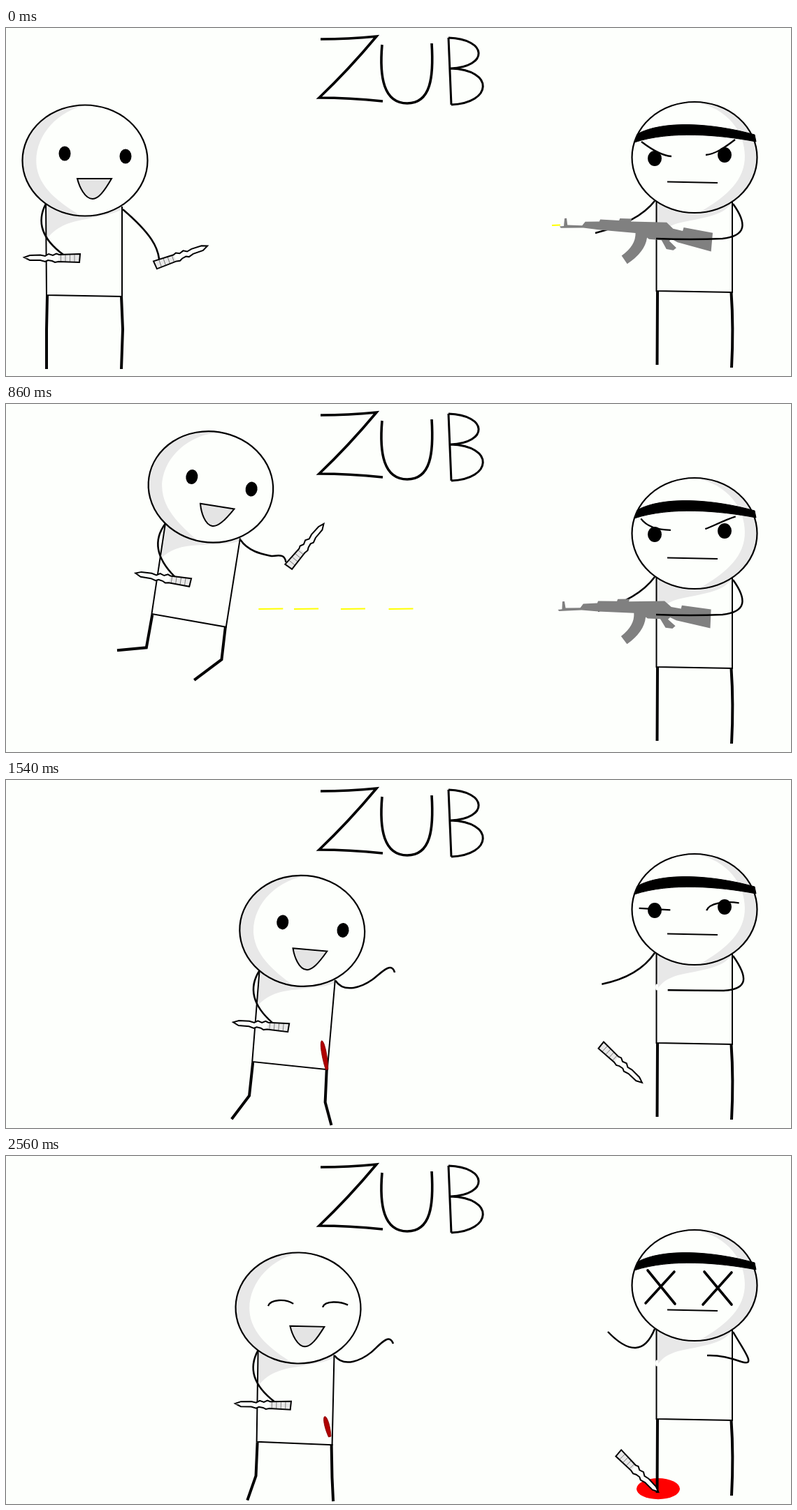
Animation of 1123 by 499 pixels, one loop 2.72 s. Source, as an HTML page with a canvas:

```html
<!DOCTYPE html>
<html>
<head>
<meta charset="utf-8">
<style>
html, body { margin: 0; width: 1123px; height: 499px; overflow: hidden; background: #fdfffc; }
canvas { display: block; }
</style>
</head>
<body>
<canvas id="stage" width="1123" height="499"></canvas>
<script>
const c = document.getElementById('stage').getContext('2d');
const LOOP = 2720, END = 2560;
const BG = '#fdfffc', SHADE = '#e8e8e8', RAD = Math.PI / 180;
const AIM = 5, HIT = 920, THROW = 1070, LAND = 1155, STAB = 1573, LAUGH = 1900, DEAD = 2400;

// Progress of t from a to b, held at 0 and 1 outside.
const ramp = (t, a, b) => Math.max(0, Math.min(1, (t - a) / (b - a)));
const mix = (a, b, p) => a + (b - a) * p;

// Blend two paths that have the same commands.
const NUM = /-?\d+(\.\d+)?/g;
function morph(from, to, p) {
  const n = to.match(NUM);
  let i = 0;
  return from.replace(NUM, v => mix(+v, +n[i++], p).toFixed(2));
}

function draw(d, width, fill, color = '#000') {
  const p = new Path2D(d);
  if (fill) { c.fillStyle = fill; c.fill(p); }
  if (width) { c.lineWidth = width; c.strokeStyle = color; c.stroke(p); }
}

function oval(x, y, rx, ry, fill, width) {
  c.beginPath();
  c.ellipse(x, y, rx, ry, 0, 0, 7);
  if (fill) { c.fillStyle = fill; c.fill(); }
  if (width) { c.lineWidth = width; c.strokeStyle = '#000'; c.stroke(); }
}

function place(x, y, deg, fn, flip = 1) {
  c.save();
  c.translate(x, y);
  c.rotate(deg * RAD);
  c.scale(flip, 1);
  fn();
  c.restore();
}

// Head with a shaded side.
function head(x, y, shade) {
  oval(x, y, 89.5, 79.5, BG);
  c.save();
  c.clip();
  draw(shade, 0, SHADE);
  c.restore();
  oval(x, y, 89.5, 79.5, null, 2.2);
}

// Knife pointing right, handle end at the origin.
function knife() {
  const shape = 'M0 -6L30 -5L34 -6.5L39 -4L45 -6L50 -3L57 -4.5L72 -4L80 -1L72 3L57 3L50 5L46 3L40 4L36 6L31 5L1 6Z';
  draw(shape, 0, BG);
  draw('M0 -6L30 -5L31 5L1 6Z', 0, SHADE);
  for (let x = 8; x < 30; x += 6.5) draw(`M${x} -5V5`, 0.7, null, '#555');
  draw(shape, 2);
}

function title() {
  draw('M450 16Q490 16 530 12Q490 60 448 100Q490 100 539 105', 3.6);
  draw('M538 24C534 70 540 108 574 108C608 108 612 70 609 22', 3.6);
  draw('M633 14L637 110M633 14C690 16 690 56 636 58C700 60 695 108 637 110', 3);
}

// Head centre and lean of the jumping man: shuffle, leap, fall, step back.
function body(t) {
  const back = ramp(t, 1380, 1600);
  const rise = (1 - ramp(t, 600, 970)) ** 2, fall = ramp(t, 970, LAND) ** 2;
  return {
    x: 113 + 26 * ramp(t, 0, 560) + 300 * ramp(t, 600, LAND) ** 0.88 - 21 * back,
    y: 112 + 78 * rise + 100 * fall + 6 * back,
    rot: 14.7 * ramp(t, 640, 1000) - 13.4 * back
  };
}

function leg(hip, knee, deg, len) {
  const a = deg * RAD;
  draw(`M${hip} 194L${knee} 242L${knee + len * Math.cos(a)} ${242 + len * Math.sin(a)}`, 4);
}

function jumper(t, b) {
  place(b.x, b.y, b.rot, () => {
    const bend = ramp(t, 0, 560), lift = ramp(t, 600, 1060);
    const land = ramp(t, 1060, LAND), rest = ramp(t, 1820, 2220);
    leg(-54, -55, 90 + 82 * bend - 11 * lift - 39 * land - 14 * rest, 57 - 15 * bend - 5 * rest);
    leg(52, 54, 92 + 50 * bend - 14 * lift - 58 * land + 16 * rest, 57 - 14 * lift - 9 * land);

    draw('M-56 62L-55 193L53 195L53 66Z', 0, BG);
    draw('M-56 55V115C-43 95 -23 88 2 84C27 78 38 78 53 70V50Z', 0, SHADE);
    draw('M-56 62L-55 193L53 195L53 66', 2);

    if (t >= HIT) place(41.5, 154.5, -14.7, () => {
      const h = 12 + 30 * ramp(t, HIT, 1180) - 12 * ramp(t, 2240, END);
      draw(`M0 0C4 1 4.5 ${h * 0.6} 2 ${h}H-1.5C-4 ${h * 0.6} -4 1 0 0Z`, 0.8, '#b00000', '#800000');
    });

    const swing = ramp(t, 640, 1040);
    draw(morph('M54 70C68 82 85 98 95 113C101 122 105 133 106 141',
      'M53.6 67C68 85 93 72 106 61C118 50 131 32 137 48', swing), 2.5);
    draw('M-56 62C-68 85 -65 110 -31 135', 2.5);
    place(-7, 140, 0, knife, -1);
    if (t <= THROW) place(100 + 50 * swing, 150 - 98 * swing, -19.4 - 72 * swing, knife);

    head(0, 0, 'M5 -80C-43 -72 -75 -30 -69 10C-63 45 -28 65 -5 80H-100V-80Z');
    if (t < LAUGH) {
      oval(-29, -10, 8.5, 10.5, '#000');
      oval(58, -6, 8.5, 10.5, '#000');
    } else {
      draw('M-43 -2C-40 -12 -18 -13 -7 -6M35 -2C38 -12 60 -11 71 -6', 2.3);
    }
    draw('M-11 26L38 26C27 45 19 55 11 55C0 55 -8 38 -11 26Z', 2, '#e4e4e4');
  });
}

function gun(t) {
  const lower = ramp(t, 600, 1020);
  const kick = t < 600 ? Math.sin(t * Math.PI / 60) * 0.6 : 0;
  const tilt = (AIM + 1.5 * ramp(t, 0, 600)) * (1 - lower) + kick;
  const fall = 0.00253 * Math.max(0, t - 1080) ** 2;
  place(1003 - 3 * lower, 305 + 3 * ramp(t, 0, 600) * (1 - lower) + fall, tilt, () => {
    c.translate(-1000, -305);
    draw('M788 303L794 302V291L797 290.5L799 300L820 299L824 293L844 291L845 288L872 287L873 284L890 283L889 287L940 284L950 292L964 294L965 289L1007 293V320L958 311L949 307L946 310L957 319L953 323L943 322L935 310L917 310L914 308Q913 329 889 348L880 337Q899 321 897 303L846 303L822 302L790 305Z', 0, '#808080');
  });
}

// Eyebrows sink from angry through calm to sad.
function brows(t) {
  const calm = 'M907 167C904 177 918 176 949 175M1045 164C1020 161 1003 166 999 174';
  const d = t < 1340
    ? morph('M909 163C922 173 937 183 952 184M1043 160C1030 170 1015 181 1001 182', calm, ramp(t, 600, 1340))
    : morph(calm, 'M904 204C908 192 935 196 952 200M1053 191C1035 188 1010 190 1006 203', ramp(t, 1340, 1780));
  draw(d, 2.3);
}

function gunner(t) {
  const pool = 31 * ramp(t, 1620, 2220);
  if (pool) oval(933, 484 - pool * 0.22, pool, 3 + pool * 0.39, '#f00');
  draw('M932 378L931.5 483M1037.5 379Q1041 430 1038 487', 4);
  draw('M930.5 248V377L1039 379V248Z', 0, BG);
  draw('M930 240V303C940 285 955 280 985 275C1010 270 1030 265 1038 250Z', 0, SHADE);
  draw('M930.5 248V377L1039 379V248', 2);
  if (t > 1100) oval(931, 297, 2, 4.5, BG);

  const flinch = ramp(t, 1400, 1820), clutch = ramp(t, 1820, 2220);
  const hang = morph('M928 248Q905 278 843 294', 'M928 248Q905 282 854 302', ramp(t, 600, 1340));
  draw(morph(morph(hang, 'M928 248Q905 282 849 274', flinch), 'M928 248Q907 300 861 252', clutch), 2.5);
  gun(t);
  const bent = morph('M1040 252C1060 280 1060 298 1025 302Q980 304 930 302',
    'M1040 252C1066 290 1066 304 1030 302Q1000 298 980 300', flinch);
  draw(morph(bent, 'M1040 252C1056 280 1074 302 1052 295Q1025 285 1003 286', clutch), 2.5);

  head(985, 185.5, 'M985 106C1040 116 1062 160 1056 195C1050 230 1015 250 990 266H1080V106Z');
  draw('M903 152C940 132 1010 136 1071 153L1073 163C1020 153 950 147 899 164Z', 1, '#000');
  draw('M946 220.5L1018 222', 2.2);
  if (t < DEAD) {
    oval(928, 187, 10, 11, '#000');
    oval(1028, 182, 10, 11, '#000');
    brows(t);
  } else {
    c.lineCap = 'round';
    draw('M918 164L957 212M956 166L915 211M999 166L1038 213M1038 167L997 213', 3.6);
    c.lineCap = 'butt';
  }
}

// Each shot: time fired and speed; it ends in the jumper's body.
function bullets(t, b) {
  for (const [fired, speed] of [[0, 0.488], [104, 0.488], [241, 0.488], [487, 0.626]]) {
    const x = 781 - (t - fired) * speed;
    if (x > 788 || x + 33 < b.x + 10) continue;
    const y = 283 + Math.max(0, t - 600) * 0.042;
    draw(`M${x} ${y}L${Math.min(x + 35, 793)} ${y - 0.5}`, 2, null, '#ff0');
  }
  if (t > 570 && t < 630) draw('M790 283H795', 2, null, '#ff0');
}

function thrown(t) {
  if (t <= THROW) return;
  const s = Math.min(t, STAB) - THROW;
  const spin = -77 + 109 * ramp(s, 0, 270) + 13 * ramp(s, 270, 503);
  place(536 + 0.732 * s, 187 - 0.415 * s + 0.00188 * s * s, spin, () => {
    c.translate(-40, 0);
    knife();
  });
}

function laugh(t) {
  if (t < LAUGH || t >= 2540) return;
  const d = t - 2240, rise = 0.495 * d + 0.00069 * d * d;
  const s = mix(0.2, 1, ramp(t, LAUGH, 2160));
  place(656 + 1.5 * rise, 122 - rise, -34.8, () => {
    c.scale(s, s);
    c.font = 'bold 63px "DejaVu Sans", sans-serif';
    c.textAlign = 'center';
    c.fillStyle = '#000';
    c.fillText('LOLOL', 0, 23);
  });
}

function render(t) {
  const b = body(t);
  c.fillStyle = BG;
  c.fillRect(0, 0, 1123, 499);
  bullets(t, b);
  gunner(t);
  jumper(t, b);
  thrown(t);
  title();
  laugh(t);
}

const start = performance.now();
function tick() {
  const t = (performance.now() - start) % LOOP;
  render(Math.min(END, Math.floor(t / 20) * 20));
  requestAnimationFrame(tick);
}
tick();
</script>
</body>
</html>
```
